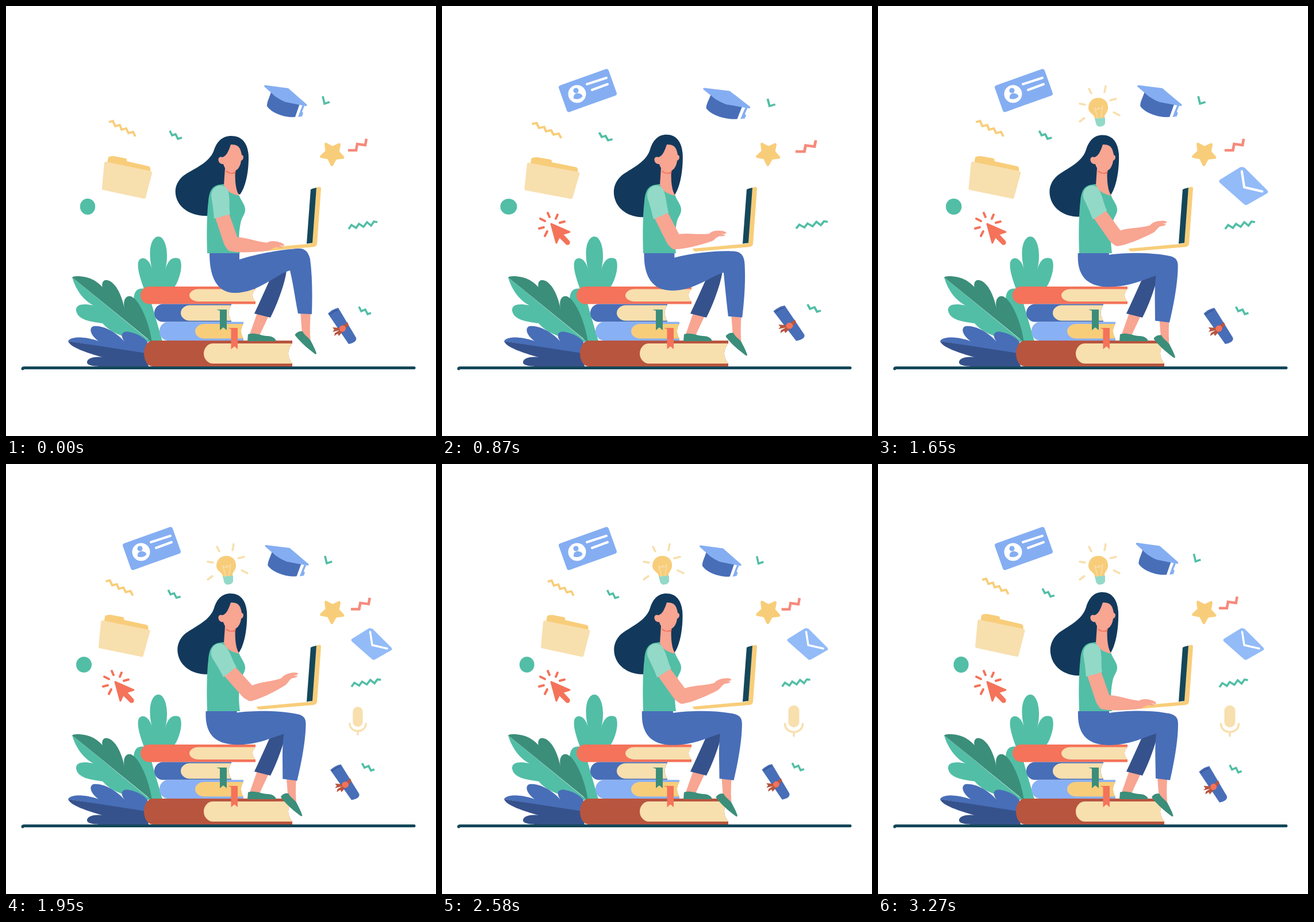
Animation of 748 by 748 pixels, one loop 3.3 s. Source, as an HTML page:

```html
<!DOCTYPE html>
<html lang="en">
<head>
<meta charset="utf-8">
<title>Online learning</title>
<style>
html, body { margin: 0; width: 100%; height: 100%; overflow: hidden; background: #fff; }
svg { display: block; width: 100%; height: 100%; }
.line { fill: none; }
.pop { transform-box: view-box; }
</style>
</head>
<body>
<svg viewBox="0 0 748 748">
  <!-- plants -->
  <g fill="#52bea6">
    <path d="M240 492C232 470 227 452 231 443C237 434 250 440 254 458C245 420 255 401 265 401C276 401 285 425 277 460C281 440 292 435 302 440C309 450 302 478 291 492Z"/>
    <path d="M222 512C222 492 232 489 246 493L272 583H248Z"/>
    <path d="M115 472C122 495 135 512 152 521C134 517 121 519 122 530C125 546 146 549 168 552C185 572 215 580 253 585Z"/>
  </g>
  <path fill="#3b8e7a" d="M115 472C118 468 142 470 153 477C167 485 175 497 179 509C166 495 164 480 172 477C184 475 199 492 206 526C203 512 208 503 217 505C232 510 249 550 254 585Z"/>
  <path fill="#486eb8" d="M108 583C112 575 135 574 161 583C146 572 144 560 152 557C172 554 198 573 206 584C197 571 203 565 214 567C230 570 240 577 246 584L245 606Z"/>
  <path fill="#36528c" d="M108 583C112 594 140 603 168 611C150 609 140 614 141 621C144 627 160 627 170 627H248L244 604Z"/>

  <g id="books"></g>
  <path fill="#3b8e7a" d="M366 528H384V564L378 559L372 564V530Z"/>
  <path fill="#f4735a" d="M386 560H403V597L397.500 592L391.500 597V562Z"/>
  <path class="line" stroke="#14475a" stroke-width="5" stroke-linecap="round" d="M29 631Q29 629.500 32 629.500H710"/>

  <!-- woman -->
  <path id="hair" fill="#12395c" d="M392 226C412 226 422 241 422 264C422 292 416 316 407 328L380 318L352 365C330 366 310 358 300 342C291 326 293 308 309 295C326 283 355 273 362 250C367 236 376 226 392 226Z"/>
  <path fill="#52bea6" d="M350 430C349 400 349 365 352 340C354 318 360 310 381 310Q388 326 405 328C409 340 417 346 416 356C415 364 410 367 408 378C404 398 405 415 407 430Z"/>
  <path fill="#f8a592" d="M381 282L379 311Q384 326 406 330Q397 318 399 282Z"/>
  <path fill="#f3705a" d="M383 286Q392 294 400 287L399 291Q389 293 383 289Z"/>
  <path fill="#f8a592" d="M391 241C386 256 383 260 377 263C371 261 368 265 370 270C371 274 375 275 378 275C381 285 387 290 393 289C402 288 408 279 409 269C413 268 415 260 410 259C409 252 407 246 402 243C398 241 394 241 391 241Z"/>

  <path fill="#f8a592" d="M437 534L457 539L441 573L424 571Z"/>
  <path fill="#3b8e7a" d="M421 571C434 567 444 574 454 574C463 574 469 578 470 583H420Z"/>
  <path fill="#36528c" d="M458 478L488 460C485 485 471 520 460 542L432 535C440 518 449 498 458 478Z"/>
  <g id="foot">
    <path fill="#f8a592" d="M512 530L530 531C529 550 528 565 530 585L515 570Z"/>
    <path fill="#3b8e7a" d="M503 571Q508 565 516 566C519 573 527 577 530 582C533 588 538 597 540 604Q540 607 537 605C525 596 513 586 503 573Z"/>
  </g>
  <path id="pants" fill="#486eb8"/>
  <path fill="#f8cd7a" d="M540 316L546 314.500Q548 315 548 318L541 414Q540 418 536 419L442 427Q437 427 436 422L530 413.500Z"/>
  <path fill="#14475a" d="M530 319Q535 317 540 316L533 412L523 413.500Z"/>
  <g fill="#f8a592">
    <g id="upper">
      <path d="M30 18L82 13.500Q95 12 98 2L78 -12L30 -7Z"/>
      <path fill="#93d9c8" d="M36 20Q18 17 1 16C-22 15 -23 -12 -6 -15C8 -16 24 -9 35 -9Q36 5 36 20Z"/>
    </g>
    <path id="fore" d="M-3 13C-14 9 -10 -8 2 -11C20 -14 40 -5 61 -4C69 -9 78 -7 85 -5Q91 -3 91 0Q88 2 81 -1L89 3Q86 5 78 3C72 4 68 9 62 10C44 13 22 15 6 14Z"/>
  </g>

  <!-- floating shapes -->
  <g id="float">
    <ellipse cx="142" cy="349" rx="13.200" ry="14" fill="#52bea6"/>
    <path fill="#f8cd7a" d="M175 282L177 268L178 263Q181 261 187 261L208 265Q211 266 210 270L249 279Q252 281 251 288Z"/>
    <path fill="#f8dfae" d="M174 271L251 287Q255 288 254 291L243 333Q242 336 239 335L169 320Q166 319 167 316L171 273Q172 270 174 271Z"/>
    <path fill="#486eb8" d="M461 150C458 160 454 166 454 174C462 187 488 195 503 193L511 170Z"/>
    <path fill="#85aef2" d="M449 140Q449 137 453 138L491 143L523 171Q525 174 521 174L486 167Q478 164 468 157Z"/>
    <path fill="#85aef2" d="M516 172L519 174L515 184L517 186L515 192L508 193L511 185L512 182Z"/>
    <g class="line" stroke="#52bea6" stroke-width="3.600">
      <path d="M551 157L554 170L563 167"/>
      <path d="M285 217L289 225L295 223L299 231L306 229"/>
      <path d="M614 523L618 531L625 528L629 536L635 534"/>
      <path d="M596 388L601 381L609 386L614 379L622 384L628 376L635 382L640 375L646 376"/>
    </g>
    <path class="line" stroke="#f8cd7a" stroke-width="3.800" d="M179 202L186 200L190 209L198 207L201 215L209 213L213 221L221 219L225 227"/>
    <path class="line" stroke="#f58a7b" stroke-width="4.500" d="M595 251L609 251L611 240L625 242L627 231"/>
    <path fill="#486eb8" d="M560 535Q568 527 578 525L609 577Q611 585 596 588Z"/>
    <path class="line" stroke="#36528c" stroke-width="1.500" d="M563 537Q571 530 577 529"/>
    <path fill="#b8553f" d="M568 559L582 560L594 550L596 555L588 564L579 574L577 570L571 574L572 569L580 564L568 567L571 563Z"/>
    <circle cx="585.500" cy="561" r="5.500" fill="#f4735a"/>
  </g>
  <path id="star" fill="#f8cd7a" stroke="#f8cd7a" stroke-width="5" stroke-linejoin="round"/>

  <!-- icons that pop in -->
  <g class="pop">
    <path fill="#f4735a" stroke="#f4735a" stroke-width="3" stroke-linejoin="round" d="M190 379L222 393L209 397L221 410Q222 415 217 414L204 401L199 412Z"/>
    <path class="line" stroke="#f4735a" stroke-width="4" stroke-linecap="round" d="M184 360L187 367M201 363L198 370M171 370L179 374M169 387L177 385M183 392L179 400M205 377L213 375"/>
  </g>
  <g class="pop">
    <rect x="207.500" y="122.500" width="92" height="49" rx="4" fill="#85aef2" transform="rotate(-19.600 253.500 147)"/>
    <circle cx="235" cy="153" r="15.500" fill="#fff"/>
    <circle cx="233" cy="147" r="4.600" fill="#85aef2"/>
    <path fill="#85aef2" d="M229 161C228 153 234 151 238 152C243 153 245 156 244 158Q238 164 229 161Z"/>
    <path class="line" stroke="#fff" stroke-width="4" stroke-linecap="round" d="M252 136L286 125M261 146L288 136"/>
  </g>
  <g class="pop">
    <path class="line" stroke="#f8dfae" stroke-width="3.500" stroke-linecap="round" d="M367 144L371 152M396 139.500L394 150M404 164L414 161.500M410 185L420 190M351 170L360 171.500M351 201L359 195"/>
    <path fill="#f8cd7a" d="M377 196C377 188 366 187 366 177C367 154 399 155 400 175C401 186 393 187 394 195Z"/>
    <path class="line" stroke="#f8dfae" stroke-width="1.300" d="M382 195L377 177Q382 184 384 176Q386 184 391 174L388 194"/>
    <path fill="#93d9c8" d="M377 196L395 194L395 205L391 209L384 210L380 207Z"/>
  </g>
  <g class="pop">
    <path fill="#93bbf8" d="M602 304L631 286Q635 285 638 287L670 319Q673 322 670 324L642 340Q638 342 636 339L602 309Q599 306 602 304Z"/>
    <path class="line" stroke="#fff" stroke-width="3.500" stroke-linecap="round" stroke-linejoin="round" d="M633.500 292L637 315L663 321"/>
  </g>
  <g class="pop">
    <rect x="602.500" y="420" width="19" height="38" rx="9" fill="#f8dfae"/>
    <path class="line" stroke="#f8dfae" stroke-width="3.600" stroke-linecap="round" d="M596.500 452C597 471 627 471 627.500 452M612 467V473"/>
  </g>
</svg>
<script>
const $ = id => document.getElementById(id);
const LOOP = 3300, STEP = 30;
const TIMES = [0, 480, 1230, 1650, 2280, 2850, 3270];

function book(x1, y1, x2, y2, color, px, pad, paper, dent) {
  const mid = (y1 + y2) / 2, top = y1 + pad, bottom = y2 - pad;
  const shape = (x, a, b, r, c) =>
    `<path fill="${c}" d="M${x2} ${a}H${x + r}A${r} ${(b - a) / 2} 0 0 0 ${x + r} ${b}H${x2}V${bottom}Q${x2 - dent} ${mid} ${x2} ${top}Z"/>`;
  return shape(x1, y1, y2, 15, color) + shape(px, top, bottom, 16, paper);
}
$("books").innerHTML =
  book(234, 488, 434, 518.5, "#f4735a", 319, 4.5, "#f8dfae", 10) +
  book(258, 518.5, 392, 549.5, "#486eb8", 304, 2, "#f8dfae", 9) +
  book(267, 549.5, 413, 582, "#88b0f4", 329, 3.5, "#f8cd7a", 8) +
  book(240, 582, 498, 627, "#b8553f", 344, 5, "#f8dfae", 14);

let star = "";
for (let i = 0; i < 10; i++) {
  const a = (92 + i * 36) * Math.PI / 180, r = i % 2 ? 10 : 19.5;
  star += `${i ? "L" : "M"}${567.5 + r * Math.cos(a)} ${256.5 + r * Math.sin(a)}`;
}
$("star").setAttribute("d", star + "Z");

// Smooth curve through values v at times x
function curve(t, v, x = TIMES) {
  const n = x.length - 1;
  if (t >= x[n]) return v[n];
  let i = 0;
  while (t >= x[i + 1]) i++;
  const slope = j => {
    const a = Math.max(j - 1, 0), b = Math.min(j + 1, n);
    return (v[b] - v[a]) / (x[b] - x[a]);
  };
  const h = x[i + 1] - x[i], u = (t - x[i]) / h, w = 1 - u;
  return v[i] * w * w * (1 + 2 * u) + v[i + 1] * u * u * (3 - 2 * u)
    + h * u * w * (slope(i) * w - slope(i + 1) * u);
}

const STRETCH_T = [0, 480, 540, 780, 1080, 1230, 1650, 2160, 2280, 2850, 3270];
const STRETCH = [1, 1.0585, 1.075, 1.105, 1.077, 1.048, 1.04, 1.013, 1.003, .9635, .99];
const SQUASH_T = [0, 480, 700, 1230, 1650, 2280, 2700, 2850, 3270];
const SQUASH = [1, .978, .973, .99, 1, .97, .99, 1.002, 1.003];

const PANTS_A = "M354 430L406 430L406 441C440 430 480 424 505 422C520 420 526 428 529 440C533 470 533 505 532 536L508 535C503 510 500 485 494 460C470 466 440 499 398 499C366 499 354 470 354 430Z";
const PANTS_B = "M348 430L402 430L402 433C430 429 470 428 500 433C517 435 522 440 522 452C522 480 516 515 508 550L483 547C483 520 481 495 484 469C465 474 440 489 402 489C366 489 346 472 348 430Z".match(/\d+/g);
function pants(k) {
  let i = 0;
  return PANTS_A.replace(/\d+/g, a => +a + (PANTS_B[i++] - a) * k);
}

const POPS = [[196, 387, 0], [253.5, 147, 100], [384, 174, 1010], [636.5, 313.5, 1320], [612, 447, 1700]];
const icons = document.querySelectorAll(".pop");
function popScale(u) {
  if (u <= 0) return 0;
  if (u < 330) return 1.2 * u / 330;
  return u < 450 ? 1.1 + .1 * Math.cos((u - 330) / 120 * Math.PI) : 1;
}

const place = (el, s) => el.setAttribute("transform", s);
const scaleAt = (x, y, sx, sy) => `translate(${x} ${y}) scale(${sx} ${sy}) translate(${-x} ${-y})`;

function draw(t) {
  place($("float"), scaleAt(398.6, 350, curve(t, STRETCH, STRETCH_T), curve(t, SQUASH, SQUASH_T)));
  place($("hair"), scaleAt(367, 295.5,
    curve(t, [1, .977, .918, .948, .945, .93, .93]),
    curve(t, [1, 1.012, 1.043, 1.022, 1.004, 1.022, 1.043])));

  $("pants").setAttribute("d", pants(curve(t, [0, .17, .66, 1.04, 1.04, 1, 1])));
  const step = curve(t, [0, .1, .6, .87, .96, 1, 1]);
  place($("foot"), `translate(${-26.5 * step} ${7.5 * step})`);

  const upper = curve(t, [76.6, 71.8, 65, 60, 50.2, 69.8, 76.6]);
  const fore = curve(t, [1.9, -4.2, -13.7, -18, -24, -10.6, 1.9]);
  const a = upper * Math.PI / 180;
  place($("upper"), `translate(373 330) rotate(${upper})`);
  place($("fore"), `translate(${373 + 86 * Math.cos(a)} ${330 + 86 * Math.sin(a)}) rotate(${fore})`);

  icons.forEach((el, i) => {
    const [x, y, start] = POPS[i], s = popScale(t - start);
    place(el, scaleAt(x, y, s, s));
    el.style.display = s ? "" : "none";
    el.style.filter = s < 1 ? `blur(${(1 - s) * 5}px)` : "none";
  });
}

const begin = performance.now();
function frame() {
  const t = (performance.now() - begin) % LOOP;
  draw(Math.floor(t / STEP) * STEP);
  requestAnimationFrame(frame);
}
frame();
</script>
</body>
</html>
```
